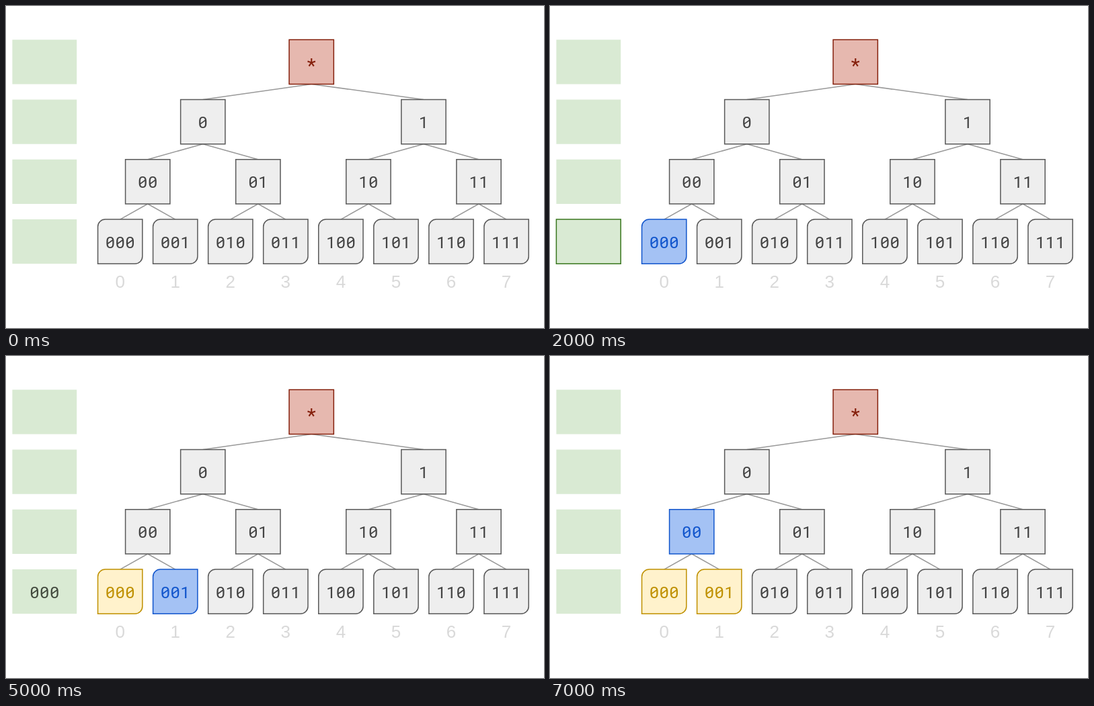
Animation, 800 px wide and 480 px high, one loop 8 s. Source, as an HTML page:

```html
<!DOCTYPE html>
<html lang="en">
<head>
<meta charset="utf-8">
<title>Binary tree with stack</title>
<style>
html, body { margin: 0; width: 100%; height: 100%; overflow: hidden; background: #fff; }
svg { display: block; width: 800px; height: 480px; }
text { font: 24.8px Roboto, sans-serif; text-anchor: middle; fill: currentColor; stroke: none; }
.slash { stroke: currentColor; stroke-width: 1.7; fill: none; }
.edge { stroke: #999; stroke-width: 1.5; }
.index { font: 26px "Liberation Sans", Arial, sans-serif; fill: #d9d9d9; }
.node { fill: #eee; stroke: #595959; stroke-width: 1.5; color: #434343; }
.root { fill: #e6b8af; stroke: #85200c; color: #85200c; }
.root text { font-size: 30px; }
.slot { fill: #d9ead3; stroke: transparent; stroke-width: 1.5; color: transparent; }

.n000, .n001, .n00, .store { animation: 8s step-end infinite; }
.n000 { animation-name: first; }
.n001 { animation-name: second; }
.n00 { animation-name: parent; }
.store { animation-name: store; }

@keyframes first {
  12.5% { fill: #a4c2f4; stroke: #1155cc; color: #1155cc; }
  50%, 100% { fill: #fff2cc; stroke: #bf9000; color: #bf9000; }
}
@keyframes second {
  62.5% { fill: #a4c2f4; stroke: #1155cc; color: #1155cc; stroke-width: 1.5; }
  75% { stroke-width: 3; }
  87.5%, 100% { fill: #fff2cc; stroke: #bf9000; color: #bf9000; stroke-width: 1.5; }
}
@keyframes parent {
  87.5%, 100% { fill: #a4c2f4; stroke: #1155cc; color: #1155cc; }
}
@keyframes store {
  25% { stroke: #38761d; }
  37.5% { color: #38761d; }
  50% { stroke: transparent; color: #434a3e; stroke-width: 1.5; }
  75% { stroke: #38761d; color: #38761d; stroke-width: 3; }
  87.5%, 100% { stroke: transparent; color: transparent; stroke-width: 1.5; }
}
</style>
</head>
<body>
<svg id="stage" viewBox="0 0 800 480"></svg>
<script>
const stage = document.getElementById('stage');
const SIZE = 66.2, PITCH = 14.8;
const rowTop = level => 50.2 + 89.3 * level;
const centerX = (level, i) => level === 0 ? 454.2
  : 169.7 + 82.05 * ((i + 0.5) * 2 ** (3 - level) - 0.5);

function add(parent, tag, attrs, content = '') {
  const el = document.createElementNS('http://www.w3.org/2000/svg', tag);
  for (const key in attrs) el.setAttribute(key, attrs[key]);
  el.textContent = content;
  return parent.appendChild(el);
}

// Digits on a fixed pitch, with slashed zeros.
function label(group, str, cx, cy) {
  const y = cy + 9.3;
  [...str].forEach((ch, i) => {
    const x = cx + (i - (str.length - 1) / 2) * PITCH;
    add(group, 'text', { x, y: ch === '*' ? cy + 15.6 : y }, ch);
    if (ch === '0') add(group, 'path', { class: 'slash', d: `M${x - 4},${y - 6}l8,-5.8` });
  });
}

function box(cls, str, cx, top, width, round) {
  const group = add(stage, 'g', { class: cls });
  const r = round ? 11 : 0, w = width - r, h = SIZE - r;
  add(group, 'path', {
    d: `M${cx - width / 2 + r},${top}h${w}v${h}a${r},${r} 0 0 1 ${-r},${r}` +
       `h${-w}v${-h}a${r},${r} 0 0 1 ${r},${-r}z`
  });
  label(group, str, cx, top + SIZE / 2);
}

for (let level = 0; level < 3; level++) {
  for (let i = 0; i < 2 ** (level + 1); i++) {
    add(stage, 'line', {
      class: 'edge',
      x1: centerX(level, i >> 1), y1: rowTop(level) + SIZE,
      x2: centerX(level + 1, i), y2: rowTop(level + 1)
    });
  }
}

for (let level = 0; level < 4; level++) {
  const top = rowTop(level), leaf = level === 3;
  box(leaf ? 'slot store' : 'slot', leaf ? '000' : '', 57.3, top, 95.8);
  for (let i = 0; i < 2 ** level; i++) {
    const name = level ? i.toString(2).padStart(level, '0') : '*';
    const cx = centerX(level, i);
    box('node ' + (level ? 'n' + name : 'root'), name, cx, top, 66.3, leaf);
    if (leaf) add(stage, 'text', { class: 'index', x: cx, y: 419.6 }, i);
  }
}
</script>
</body>
</html>
```
